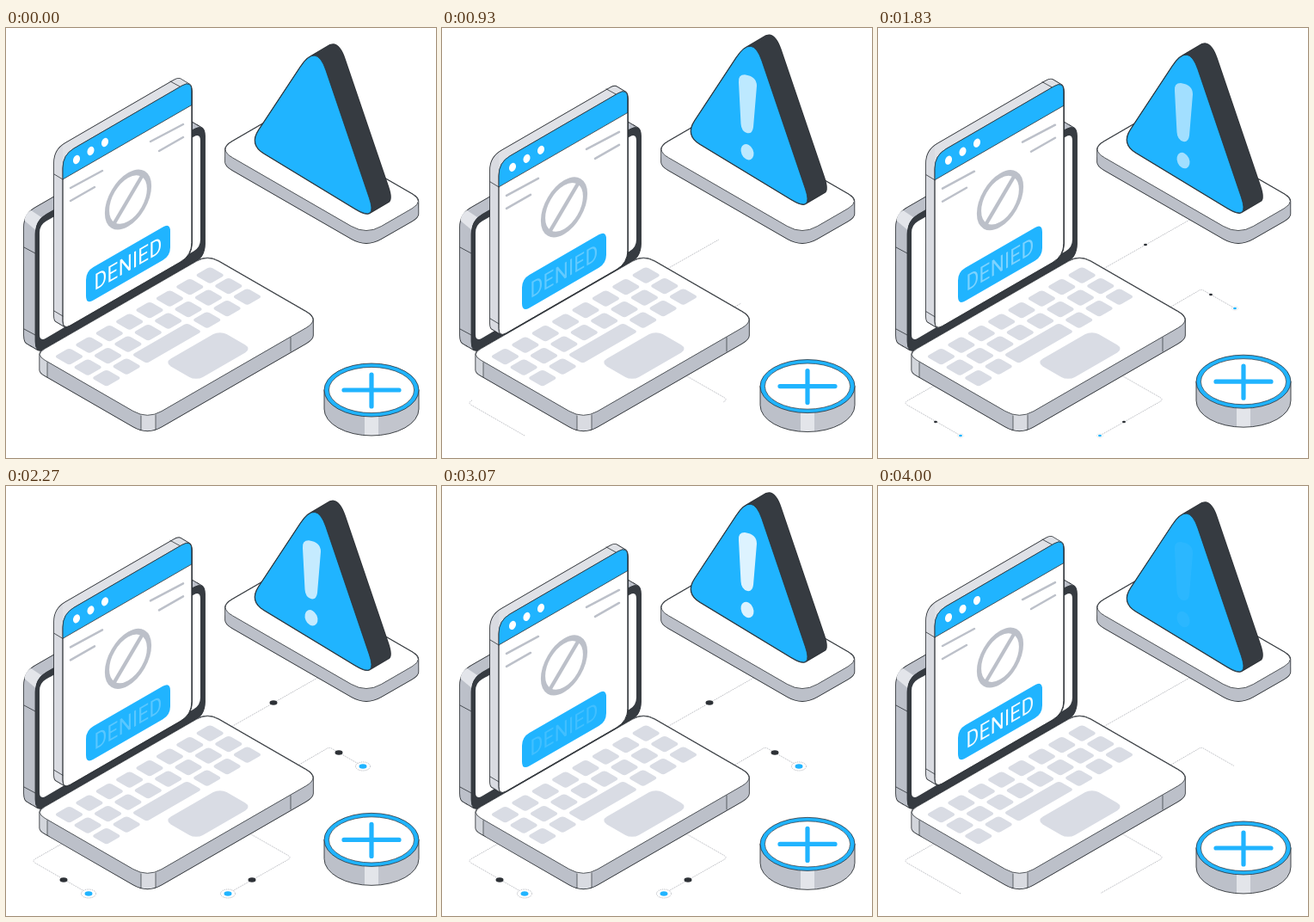
Write an HTML page that moves like this. It is 500 by 500 pixels and loops after 4.03 s.

```html
<!DOCTYPE html>
<html>
<head>
<meta charset="utf-8">
<style>
html, body { margin: 0; height: 100%; overflow: hidden; background: #fff; }
svg { display: block; width: 100vw; height: 100vh; }
text { font: 26px Roboto, Arial, sans-serif; letter-spacing: .3px; text-anchor: middle; fill: #fff; }
</style>
</head>
<body>
<svg id="stage" viewBox="0 0 500 500"></svg>
<script>
const BLUE = '#20b4ff', DARK = '#363b41', INK = '#2d3136', GREY = '#bcc0c9', PALE = '#d9dce4', LIGHT = '#e3e5ea';
const LOOP = 4030;
const stage = document.getElementById('stage');

// Polygon with softened corners; r is one cut length or one per corner.
function round(pts, r, dx = 0, dy = 0) {
  const n = pts.length;
  const toward = (a, b, d) => {
    const k = d / Math.hypot(b[0] - a[0], b[1] - a[1]);
    return `${(a[0] + (b[0] - a[0]) * k + dx).toFixed(2)} ${(a[1] + (b[1] - a[1]) * k + dy).toFixed(2)}`;
  };
  return pts.map((p, i) => {
    const d = Array.isArray(r) ? r[i] : r;
    return `${i ? 'L' : 'M'}${toward(p, pts[(i + n - 1) % n], d)}Q${p[0] + dx} ${p[1] + dy} ${toward(p, pts[(i + 1) % n], d)}`;
  }).join('') + 'Z';
}

const path = (d, fill, stroke = 'none', w = 1, more = '') =>
  `<path d="${d}" fill="${fill}" stroke="${stroke}" stroke-width="${w}" stroke-linecap="round" ${more}/>`;
const line = (d, color, w) => path(d, 'none', color, w);
const oval = (x, y, rx, ry, fill, more = '') =>
  `<ellipse cx="${x}" cy="${y}" rx="${rx}" ry="${ry}" fill="${fill}" ${more}/>`;

// Slab: the face swept along (dx, dy), outlined, with the face on top.
function slab(pts, r, dx, dy, side, face) {
  const n = Math.ceil(Math.hypot(dx, dy));
  let hull = '';
  for (let i = 0; i <= n; i++) hull += round(pts, r, dx * i / n, dy * i / n);
  return path(hull, 'none', INK, 1.7) + path(hull, side) + path(round(pts, r), face, INK, .8);
}

// Hard-edged horizontal bands for the slab sides: [color, x0, x1] triples.
const bands = (id, list) =>
  `<linearGradient id="${id}" gradientUnits="userSpaceOnUse" x1="0" y1="0" x2="500" y2="0">` +
  list.map(([c, a, b]) => `<stop offset="${a / 500}" stop-color="${c}"/><stop offset="${b / 500}" stop-color="${c}"/>`).join('') +
  '</linearGradient>';

function lid() {
  const face = [[34, 224], [231, 110.5], [231, 266], [34, 380]];
  const glass = [[39, 229], [226, 122], [226, 255], [39, 365]];
  return slab(face, 15, -13, -7.5, GREY, DARK) +
    path('M21.500 224L34.500 235Q35 226 41 220L29 212Q22 216 21.500 224Z', LIGHT) +
    line('M21 255L34 262M21 350L34 357', INK, .8) +
    path(round(face, 15), DARK) +
    path(round(glass, 9), '#fff');
}

function deck() {
  const face = [[33.6, 379.6], [234.3, 263.8], [365.2, 339.3], [164.5, 455.1]];
  const key = (x, y, w, h, r) => `<rect x="${x}" y="${y}" width="${w}" height="${h}" rx="${r}" fill="${PALE}"/>`;
  let keys = key(44, 40, 74, 20, 3.5) + key(56.7, 70.7, 75, 43, 9);
  for (let j = 0; j < 3; j++)
    for (let i = 0; i < 8; i++)
      if (j < 2 || i < 2 || i > 4) keys += key(27 * i - 10, 25 * j - 10, 20, 20, 3.5);
  return slab(face, [13, 15, 19, 19], 0, 18, 'url(#deckSide)', '#fff') +
    line('M48 389V406M157 451V467M174 450V467M331 360V376', INK, .7) +
    `<g transform="matrix(.866 -.5 .866 .5 73.5 382)">${keys}</g>`;
}

function panel() {
  const face = [[66, 147.5], [216, 60.5], [216, 264.5], [66, 351]];
  const cut = [15, 13, 15, 10];
  const button = [[93, 283], [191, 226.5], [191, 265], [93, 321.5]];
  const dots = [[82, 153], [98.5, 143], [115, 133]]
    .map(([x, y]) => oval(x, y, 3.8, 5.3, '#fff', `transform="rotate(22 ${x} ${y})"`)).join('');
  return slab(face, cut, -10, -6, 'url(#panelSide)', '#fff') +
    `<clipPath id="faceClip">${path(round(face, cut), '#000')}</clipPath>` +
    path('M66 130L216 45V89.5L66 176Z', BLUE, INK, .8, 'clip-path="url(#faceClip)"') +
    path(round(face, cut), 'none', INK, .8) +
    line('M56 170L66 176M56 329L66 335M191 62L202 68', INK, .8) + dots +
    line('M75 186L112 166M75 201L103 185M168 132L206 112M178 143L206 127', GREY, 2.5) +
    `<g transform="matrix(.866 -.5 0 1 142 199.5)" fill="none" stroke="${GREY}" stroke-width="6">
       <circle r="28.3"/><path d="M-19-18.5L19 18.5" transform="scale(1 -1)"/></g>` +
    path(round(button, 10), BLUE) +
    '<text id="word" transform="matrix(.866 -.5 0 1 142 273.5)" y="9.3">DENIED</text>';
}

const stand = () =>
  slab([[246.8, 141.2], [314.6, 102], [486.8, 201.4], [419, 240.6]], [19, 19, 17, 20], 0, 14.5, GREY, '#fff');

const warning = () =>
  slab([[282.8, 135.5], [361, 17], [432, 226]], [20, 34, 30], 22, -13, DARK, BLUE) +
  `<g id="mark" fill="#fff">
     <path d="M345 74Q344 65 352 65Q366 67 366 78L362 126Q361 134 355 133Q348 131 347.500 122Z"/>
     ${oval(355, 155, 7, 9.6, '#fff', 'transform="rotate(-24 355 155)"')}</g>`;

const coin = () =>
  path('M370 421V443A55 31 0 0 0 480 443V421Z', 'url(#coinSide)', INK, .9) +
  oval(425, 421, 55, 31, BLUE, `stroke="${INK}" stroke-width=".8"`) +
  oval(425, 421, 49.6, 26.6, '#fff', `stroke="${INK}" stroke-width=".7"`) +
  line('M393 421H457M425 403V440', BLUE, 5.2);

// Traces: path, drawing speed in px per ms.
const traces = [
  ['M239 293L366 221', .104],
  ['M272 364L372 306Q376 303 380 306L415 326', .096],
  ['M243 381L327 429Q333 432 327 435L258 474', .114],
  ['M96 474L35 439Q29 436 35 433L72 412', .088]
];
const knots = [[311, 252], [387, 310], [67, 458], [286, 458]];
const ends = [[415, 326], [96, 474], [258, 474]];
const pop = (x, y, body) => `<g transform="translate(${x} ${y})"><g class="pop">${body}</g></g>`;

stage.innerHTML = '<defs>' +
  bands('deckSide', [['#d3d6dc', 0, 48], [GREY, 48, 157], ['#d9dbe1', 157, 174], [GREY, 174, 500]]) +
  bands('panelSide', [['#d9dbe1', 0, 66], ['#dfe1e6', 66, 500]]) +
  bands('coinSide', [[GREY, 0, 417], [LIGHT, 417, 433], ['#c2c5cd', 433, 500]]) +
  '</defs>' +
  traces.map(([d]) => path(d, 'none', '#a6a9af', .9, 'class="trace" style="stroke-linecap:butt"')).join('') +
  knots.map(([x, y]) => pop(x, y, oval(0, 0, 4.5, 2.7, INK))).join('') +
  ends.map(([x, y]) => pop(x, y,
    oval(0, 0, 8.5, 5, '#fff', 'stroke="#a6a9af" stroke-width=".9" stroke-dasharray="1 1"') + oval(0, 0, 4.5, 2.7, BLUE))).join('') +
  lid() + deck() + `<g id="panel">${panel()}</g>` +
  stand() + `<g id="warning">${warning()}</g><g id="coin">${coin()}</g>`;

const get = id => document.getElementById(id);
const traceEls = [...document.querySelectorAll('.trace')];
const lengths = traceEls.map(e => e.getTotalLength());
const pops = document.querySelectorAll('.pop');
const clamp = v => Math.min(1, Math.max(0, v));
const wave = (t, period) => (1 - Math.cos(2 * Math.PI * t / period)) / 2;
const zigzag = (t, period) => 1 - Math.abs(1 - 2 * (t % period) / period);
const lift = (id, y) => get(id).setAttribute('transform', `translate(0 ${y.toFixed(2)})`);

function draw(t) {
  const bob = wave(t, LOOP / 2);
  lift('panel', 9 * bob);
  lift('warning', -11 * bob);
  lift('coin', -10 * wave(t, LOOP));

  const blink = zigzag(Math.max(0, t - 33), 664);
  get('mark').setAttribute('opacity', blink);
  get('word').setAttribute('opacity', 1 - blink);

  traceEls.forEach((e, i) => {
    const shown = Math.min(lengths[i], t * traces[i][1]);
    e.setAttribute('stroke-dasharray', '1 1 '.repeat(Math.floor(shown / 2)) + '0 999');
  });
  const size = clamp((t - 1700) / 300) * clamp((3960 - t) / 250);
  pops.forEach(e => e.setAttribute('transform', `scale(${size})`));
}

const start = performance.now();
function tick() {
  draw((performance.now() - start) % LOOP);
  requestAnimationFrame(tick);
}
tick();
</script>
</body>
</html>
```
